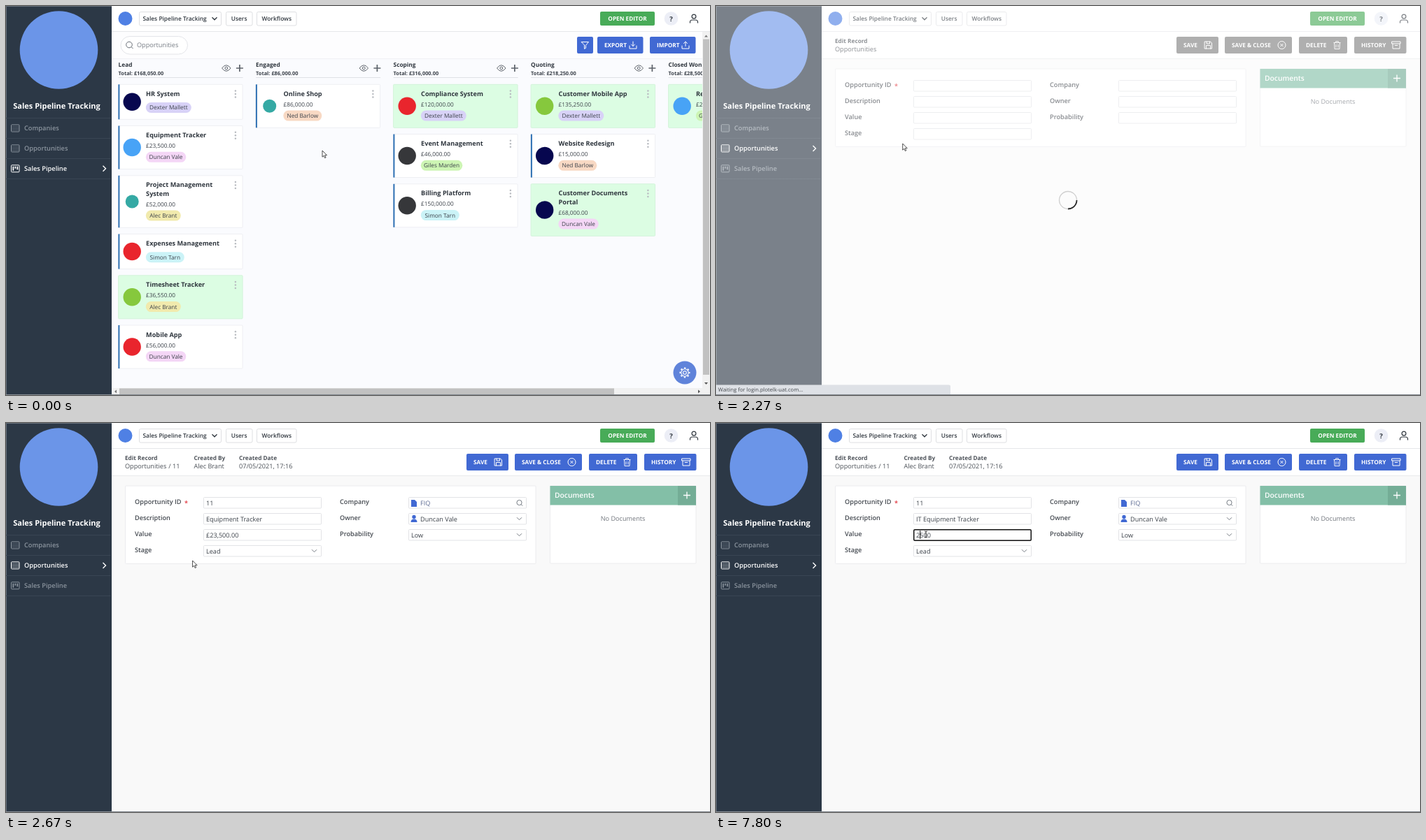
These frames come from a looping animation (1006 px wide and 557 px high, 8000 ms). An HTML page:

```html
<!DOCTYPE html>
<html lang="en">
<head>
<meta charset="utf-8">
<title>Sales pipeline</title>
<style>
html, body { margin: 0; width: 100%; height: 100%; overflow: hidden; background: #fff; }
svg { display: block; }
text { font-family: "Open Sans", "Noto Sans", sans-serif; text-rendering: geometricPrecision; white-space: pre; }
</style>
</head>
<body>
<svg id="stage" width="1006" height="557" viewBox="0 0 1006 557"></svg>
<script>
const BLUE = '#4169d3', NAVY = '#2c3846', INK = '#2f363e', SOFT = '#3b4149';

const rect = (x, y, w, h, fill, extra = '') =>
  `<rect x="${x}" y="${y}" width="${w}" height="${h}" fill="${fill}" ${extra}/>`;
const box = (x, y, w, h, stroke, r = 2) =>
  rect(x + .5, y + .5, w - 1, h - 1, '#fff', `stroke="${stroke}" rx="${r}"`);
const circle = (x, y, r, fill, extra = '') =>
  `<circle cx="${x}" cy="${y}" r="${r}" fill="${fill}" ${extra}/>`;
const text = (x, y, size, weight, fill, str, extra = '') =>
  `<text x="${x}" y="${y}" font-size="${size}" font-weight="${weight}" fill="${fill}" ${extra}>${str}</text>`;
const line = (d, stroke, w = 1, extra = '') =>
  `<path d="${d}" fill="none" stroke="${stroke}" stroke-width="${w}" ${extra}/>`;
const solid = (d, fill) => `<path d="${d}" fill="${fill}"/>`;
const at = (x, y, body) => `<g transform="translate(${x} ${y})">${body}</g>`;
const group = (id, body) => `<g id="${id}">${body}</g>`;
const ROUND = 'stroke-linecap="round" stroke-linejoin="round"';

const chevron = (x, y, stroke, w = 1, s = 3.5) =>
  line(`M${x - s} ${y - s / 2}l${s} ${s}l${s} ${-s}`, stroke, w);
const plus = (x, y, stroke, s, w) => line(`M${x - s} ${y}h${2 * s}M${x} ${y - s}v${2 * s}`, stroke, w);
const lens = (x, y, r, stroke) =>
  circle(x, y, r, 'none', `stroke="${stroke}"`) +
  line(`M${x + r * .7} ${y + r * .7}l${r * .6} ${r * .6}`, stroke);

// Icons drawn around their own centre
const glyph = {
  filter: line('M-5 -4.5h10l-4 4.8v4l-2 1v-5z', '#fff', 1, ROUND),
  down: line('M0 -5v6.5M-2.5 -1l2.5 2.5l2.5 -2.5M-5 1v4h10v-4', '#fff', 1, ROUND),
  up: line('M0 1.5v-6.5M-2.5 -2.5l2.5 -2.5l2.5 2.5M-5 1v4h10v-4', '#fff', 1, ROUND),
  disk: line('M-5 -5h8l2 2v8h-10zM-2.5 -5v3h4.5v-3M-3 5v-4.5h6v4.5', '#fff', 1, ROUND),
  close: circle(0, 0, 5.5, 'none', 'stroke="#fff"') + line('M-2 -2l4 4M2 -2l-4 4', '#fff'),
  bin: line('M-5 -3.5h10M-1.8 -3.5v-1.8h3.6v1.8M-4 -3.5l.5 9h7l.5 -9M-1.5 -1v4.5M1.5 -1v4.5', '#fff', .9),
  archive: line('M-6 -5h12v3h-12zM-5 -2v7h10v-7M-1.8 .5h3.6', '#fff', 1, ROUND),
};
const button = (x, w, label, icon, fill = BLUE) =>
  rect(x, 44, w, 24, fill, 'rx="2"') +
  (label ? text(x + 10, 59.4, 8.25, 700, '#fff', label.replace('&', '&amp;')) : '') +
  at(x + w - (label ? 14.5 : w / 2), 56, glyph[icon]);

// ---- Side menu ----
const tableIcon = (y, c) =>
  rect(7.5, y - 5, 11.5, 10, 'none', `stroke="${c}" rx="1"`) +
  line(`M8 ${y - 2}h11M8 ${y + .3}h11M8 ${y + 2.6}h11`, c, .7, 'opacity=".65"');
const boardIcon = (y, c) =>
  rect(7.5, y - 5, 11.5, 10, 'none', `stroke="${c}" rx="1"`) +
  line(`M10.3 ${y - 3}v6M13.3 ${y - 3}v3M16.3 ${y - 3}v4.5`, c, 1.7);
function menu(active) {
  const items = ['Companies', 'Opportunities', 'Sales Pipeline'];
  return rect(0, 0, 151, 557, NAVY) + line('M.5 557V.5H151', '#656e79') + circle(75.5, 63, 55.8, '#6b95e8') +
    text(72.5, 147, 11, 700, '#fff', 'Sales Pipeline Tracking', 'text-anchor="middle"') +
    [160.5, 189.5, 218.5, 247.5].map(y => line(`M0 ${y}H150`, '#465261', 1, 'stroke-dasharray="1 1"')).join('') +
    items.map((name, i) => {
      const y = 175 + i * 28.9, on = i === active, c = on ? '#fff' : '#8b949e';
      return (i < 2 ? tableIcon : boardIcon)(y, c) + text(26, y + 3.4, 9.25, 600, c, name) +
        (on ? line(`M138.5 ${y - 4}l4 4l-4 4`, '#fff', 1.4) : '');
    }).join('');
}

// ---- Top bar ----
const topBar = () =>
  rect(151, 0, 855, 36, '#fff') + rect(151, 36, 855, 1, '#e6e7ea') +
  circle(170.5, 18, 10, '#4f80e4') +
  [[190, 118], [314, 38.5], [358, 57.5]].map(([x, w]) => box(x, 8, w, 20.5, '#dedfe2')).join('') +
  text(195.5, 21.3, 8.4, 600, INK, 'Sales Pipeline Tracking') + chevron(298, 18, INK, 1.3) +
  text(321.7, 21.3, 8.4, 600, INK, 'Users') + text(365.5, 21.3, 8.4, 600, INK, 'Workflows') +
  rect(849, 8, 78, 20, '#48ab58', 'rx="2"') +
  text(888, 21.2, 8.25, 700, '#fff', 'OPEN EDITOR', 'text-anchor="middle"') +
  circle(950.5, 18, 9.8, '#eceef6') + text(950.5, 21.5, 9.5, 700, INK, '?', 'text-anchor="middle"') +
  circle(983, 15, 2.9, 'none', `stroke="${INK}" stroke-width="1.2"`) +
  line('M977.5 24.5v-1.5q0 -3 3.2 -3h4.6q3.2 0 3.2 3v1.5', INK, 1.2);

// ---- Board ----
const people = {
  dm: ['Dexter Mallett', 65, '#d8d2f7'], dv: ['Duncan Vale', 57.5, '#f4d6f6'],
  ab: ['Alec Brant', 50, '#f1eaad'], st: ['Simon Tarn', 55, '#cbf3f7'],
  nb: ['Ned Barlow', 55, '#f8d9c4'], gm: ['Giles Marden', 59.5, '#cdf5b4'],
};
const firms = { navy: '#07074f', sky: '#48a3f6', teal: '#35a9a4', red: '#e9252d', lime: '#86c83d', dark: '#36373a' };

// title, value, owner, firm, won
const columns = [
  ['Lead', '168,050.00', [
    ['HR System', '', 'dm', 'navy'],
    ['Equipment Tracker', '23,500.00', 'dv', 'sky'],
    ['Project Management|System', '52,000.00', 'ab', 'teal'],
    ['Expenses Management', '', 'st', 'red'],
    ['Timesheet Tracker', '36,550.00', 'ab', 'lime', 1],
    ['Mobile App', '56,000.00', 'dv', 'red']]],
  ['Engaged', '86,000.00', [['Online Shop', '86,000.00', 'nb', 'teal']]],
  ['Scoping', '316,000.00', [
    ['Compliance System', '120,000.00', 'dm', 'red', 1],
    ['Event Management', '46,000.00', 'gm', 'dark'],
    ['Billing Platform', '150,000.00', 'st', 'dark']]],
  ['Quoting', '218,250.00', [
    ['Customer Mobile App', '135,250.00', 'dm', 'lime', 1],
    ['Website Redesign', '15,000.00', 'nb', 'navy'],
    ['Customer Documents|Portal', '68,000.00', 'dv', 'navy', 1]]],
  ['Closed Won', '28,500.00', [['Resource Planner', '28,500.00', 'gm', 'sky', 1]]],
];

function card(y, [title, value, owner, firm, won]) {
  const lines = title.split('|'), extra = (lines.length - 1) * 12.5;
  const h = (value ? 62 : 50) + extra;
  const [name, w, tint] = people[owner];
  const pill = (value ? 37.3 : 25.7) + extra;
  const body = rect(0, 0, 177.5, h, won ? '#dcfde3' : '#fff', `stroke="${won ? '#d3f3da' : '#eeeff3'}" rx="1"`) +
    (won ? '' : rect(-.2, 0, 2, h, '#2f71b3')) +
    circle(19.6, h / 2, firm === 'teal' ? 9.5 : 12.7, firms[firm]) +
    lines.map((s, i) => text(39.5, 16.6 + i * 12.5, 9.15, 700, INK, s)).join('') +
    (value ? text(39.5, 31.7 + extra, 8.25, 400, SOFT, '£' + value) : '') +
    rect(39.2, pill, w, 15, tint, 'rx="7.5"') +
    text(39.2 + w / 2, pill + 10.5, 8.25, 400, SOFT, name, 'text-anchor="middle"') +
    [9.3, 13.8, 18.3].map(cy => circle(167.3, cy, 1.25, '#b9bcc1')).join('');
  return [at(0, y, body), h];
}

function column([name, total, cards], i) {
  let y = 112.3, out = '';
  for (const c of cards) {
    const [body, h] = card(y, c);
    out += body;
    y += h + 9.25;
  }
  const eye = line('M148 89q6 -8.5 12.5 0q-6.5 8.5 -12.5 0z', '#5d636b') +
    circle(154.2, 89, 1.9, 'none', 'stroke="#5d636b"');
  return at(160.6 + i * 196.5, 0,
    text(0, 87, 8.3, 700, INK, name) + text(0, 98.6, 7.4, 700, SOFT, `Total: £${total}`) +
    eye + plus(173.3, 89, '#5d636b', 5, 1.7) + rect(0, 102, 178, 1, '#dfe1e6') + out);
}

const cog = () => circle(0, 0, 2.3, 'none', 'stroke="#fff" stroke-width="1.1"') +
  circle(0, 0, 5.2, 'none', 'stroke="#fff" stroke-width="1.1"') +
  circle(0, 0, 6.6, 'none', 'stroke="#fff" stroke-width="1.8" stroke-dasharray="2.4 2.784" stroke-dashoffset="1.2"');

const scrollbars = () =>
  rect(995, 37, 11, 520, '#f1f1f1') + rect(996, 47.5, 9, 480.5, '#c1c1c1') +
  rect(151, 547, 844, 10, '#f1f1f1') + rect(162, 547.5, 707, 9, '#c1c1c1') +
  solid('M998 44.5h5l-2.5 -3z', '#777') + solid('M998 539h5l-2.5 3z', '#555') +
  solid('M158 549.5v5l-3 -2.5z', '#777') + solid('M989 549.5v5l3 -2.5z', '#555');

const board = () =>
  menu(2) + rect(151, 37, 855, 520, '#fafbfe') + rect(151, 37, 844, 38, '#fdfdfe') +
  rect(151, 75, 844, 1, '#f0f1f4') +
  box(163.5, 43, 96.5, 26.5, '#e4e5e9', 13) + lens(176, 55.5, 4.3, '#666c74') +
  text(187, 59.4, 9.15, 400, '#767c84', 'Opportunities') +
  button(816, 23, '', 'filter') + button(845, 65.5, 'EXPORT', 'down') + button(920, 65.5, 'IMPORT', 'up') +
  `<clipPath id="view"><rect x="151" y="76" width="844" height="470"/></clipPath>` +
  `<g clip-path="url(#view)">${columns.map(column).join('')}</g>` + scrollbars() +
  circle(970, 525, 16.5, '#5f83da') + at(970, 525, cog());

// ---- Record form ----
const rows = [106, 129, 152, 175];
const input = (x, y) => box(x, y, 169, 16.5, '#e2e3e6', 1);
const label = (x, i, s) => text(x, rows[i] + 10.4, 9.2, 600, '#454a51', s);
const entry = (x, i, s, id = '', fill = SOFT) =>
  text(x, rows[i] + 12.1, 9.15, 400, fill, s, id && `id="${id}"`);
const actions = fill =>
  button(658, 60, 'SAVE', 'disk', fill) + button(727, 96, 'SAVE & CLOSE', 'close', fill) +
  button(833, 69, 'DELETE', 'bin', fill) + button(912, 74.5, 'HISTORY', 'archive', fill);
const heading = (x, s) => text(x, 53.2, 8.25, 700, '#4e535a', s);
const detail = (x, s) => text(x, 65.2, 9.15, 400, '#4a4f56', s);

const filled = () =>
  actions(BLUE) + detail(230, ' / 11') +
  heading(268.5, 'Created By') + detail(268.5, people.ab[0]) +
  heading(333, 'Created Date') + detail(333, '07/05/2021, 17:16') +
  entry(286, 0, '11') + entry(286, 1, '', 'desc') + entry(286, 2, '', 'value') + entry(286, 3, 'Lead') +
  solid('M579 110h5l3 3v7h-8z', BLUE) + entry(592, 0, 'FIQ', '', '#5c6a92') +
  circle(583, 134.5, 2.7, BLUE) + solid('M578.5 142q0 -4.5 4.5 -4.5t4.5 4.5z', BLUE) +
  entry(592, 1, people.dv[0]) + entry(579, 2, 'Low') + lens(733.5, 114, 3.6, '#767c84') +
  chevron(733.5, 137, '#767c84') + chevron(733.5, 160, '#767c84') + chevron(440.5, 183, '#767c84');

const form = () =>
  menu(1) + rect(151, 37, 855, 520, '#f9f9f9') + rect(151, 37, 855, 38, '#fff') +
  rect(151, 75, 855, 1, '#e9eaec') + heading(170, 'Edit Record') + detail(170, 'Opportunities') +
  box(170, 89.5, 587.5, 112.5, '#ececee', 1) +
  label(184, 0, 'Opportunity ID') + text(255, 118, 9.2, 600, '#e0343c', '*') +
  label(184, 1, 'Description') + label(184, 2, 'Value') + label(184, 3, 'Stage') +
  label(477, 0, 'Company') + label(477, 1, 'Owner') + label(477, 2, 'Probability') +
  rows.map((y, i) => input(282, y) + (i < 3 ? input(575, y) : '')).join('') +
  box(777, 89.5, 209.5, 112, '#ececee', 1) + rect(777.5, 90, 208.5, 27.5, '#83bfa7') +
  rect(960, 90, 26, 27.5, '#74ad96') + plus(973, 103.5, '#fff', 5, 1.3) +
  text(784, 107.3, 10.3, 600, '#fff', 'Documents') +
  text(881.5, 140.4, 9.15, 400, '#70757c', 'No Documents', 'text-anchor="middle"') +
  group('idle', actions('#808080')) + group('filled', filled()) +
  rect(282.75, 0, 167.5, 15.5, 'none', 'id="focus" stroke="#111" stroke-width="1.5" rx="1.5"') +
  rect(0, 0, 1, 12, '#111', 'id="caret"');

const spinner = circle(0, 0, 12.5, 'none', 'stroke="#cfcfcf" stroke-width="1.3"') +
  line('M12.5 0A12.5 12.5 0 0 1 0 12.5', '#2b2b2b', 1.8);

const outline = 'fill="#fff" stroke="#222" stroke-width=".8"';
const pointers =
  `<path id="arrow" d="M0 0v9.2l2.1 -1.9l1.5 3.3l1.5 -.7l-1.5 -3.2h2.9z" ${outline}/>` +
  `<path id="hand" d="M-1 .8q0 -1 1 -1t1 1v3.6l3.6 .8q1 .3 .9 1.4l-.6 3.2l-.7 2.2h-4.7l-2.7 -4q-.6 -1.3 .6 -1.5l1.6 1.2z" ${outline}/>` +
  line('M-2 -4.6q2 0 2 1v7.2q0 1 -2 1M2 -4.6q-2 0 -2 1M0 3.6q0 1 2 1', '#222', .9, 'id="beam"');

document.getElementById('stage').innerHTML =
  group('form', form()) + group('board', board()) + topBar() +
  rect(0, 0, 1006, 557, '#fff', 'id="veil"') + group('spin', spinner) +
  group('status', solid('M0 542.5h333q2 0 2 2v12.5h-335z', '#dee1e6') +
    text(3, 552.3, 7.6, 400, '#44484d', 'Waiting for login.plotelk-uat.com...')) +
  rect(0, 556, 1006, 1, '#858b92') + group('pointer', pointers);

const el = {};
document.querySelectorAll('[id]').forEach(n => el[n.id] = n);

// ---- Motion ----
const STEP = 200 / 3;
const path = [
  [133, 452, 207], [267, 469, 204.5], [800, 469, 204.5], [1000, 420, 222], [1133, 360, 231.5],
  [1300, 290, 221], [1467, 267, 197], [2933, 266.5, 197], [3133, 285, 175], [3267, 289, 150],
  [3400, 286.5, 137], [3533, 286.5, 137], [3600, 285.8, 136.5], [3733, 285.8, 136.5], [3800, 287, 137],
  [5600, 287, 137], [5667, 272.5, 133], [5800, 272.5, 133], [6067, 275, 141], [6267, 299, 161],
  [6400, 304, 159], [6600, 300, 159.5],
];
const veilKeys = [[2000, 0], [2267, .37], [2333, .37], [2467, .14], [2667, 0]];

function tween(keys, t) {
  const i = keys.findIndex(k => k[0] > t);
  if (i === 0) return keys[0].slice(1);
  if (i < 0) return keys[keys.length - 1].slice(1);
  const a = keys[i - 1], b = keys[i], p = (t - a[0]) / (b[0] - a[0]);
  return a.slice(1).map((v, j) => v + (b[j + 1] - v) * p);
}
const show = (id, on) => el[id].setAttribute('visibility', on ? 'inherit' : 'hidden');

function draw(t) {
  const tick = Math.floor(t / STEP + .01) * STEP;
  const within = (a, b) => t >= a && t < b;
  const onBoard = t < 2065, loaded = t >= 2395;
  show('board', onBoard);
  show('form', !onBoard);
  show('idle', !onBoard && !loaded);
  show('filled', !onBoard && loaded);
  show('status', within(2065, 2665));

  const [veil] = onBoard ? [0] : tween(veilKeys, tick + 1);
  el.veil.setAttribute('opacity', veil);
  el.spin.setAttribute('opacity', Math.min(1, veil / .37));
  el.spin.setAttribute('transform', `translate(503 278) rotate(${(tick - 2267) * .75})`);

  // Typing
  const typed = t < 4397 ? 0 : t < 4730 ? 1 : t < 5130 ? 2 : 3;
  el.desc.textContent = 'IT '.slice(0, typed) + 'Equipment Tracker';
  const inValue = t >= 6730;
  el.value.textContent = !inValue ? '£23,500.00' : t < 7797 ? '23500' : '2500';
  show('focus', t >= 3597);
  el.focus.setAttribute('y', inValue ? 152.75 : 129.75);
  show('caret', within(3597, 4130) || within(4397, 5665) || within(6197, 7265) || t >= 7797);
  const field = inValue ? el.value : el.desc, count = inValue ? 1 : typed;
  el.caret.setAttribute('x', 286 + (count ? field.getSubStringLength(0, count) : 0));
  el.caret.setAttribute('y', inValue ? 154 : 131);

  // Pointer
  const [x, y] = tween(path, tick + 1);
  const overField = x > 282 && y > 129 && y < 168;
  const kind = onBoard ? (x < 338 && y < 234 ? 'hand' : 'arrow') : overField ? 'beam' : 'arrow';
  for (const k of ['arrow', 'hand', 'beam']) show(k, k === kind);
  el.pointer.setAttribute('transform', `translate(${x} ${y})`);
}

const start = performance.now();
function loop() {
  draw((performance.now() - start) % 8000);
  requestAnimationFrame(loop);
}
loop();
</script>
</body>
</html>
```
